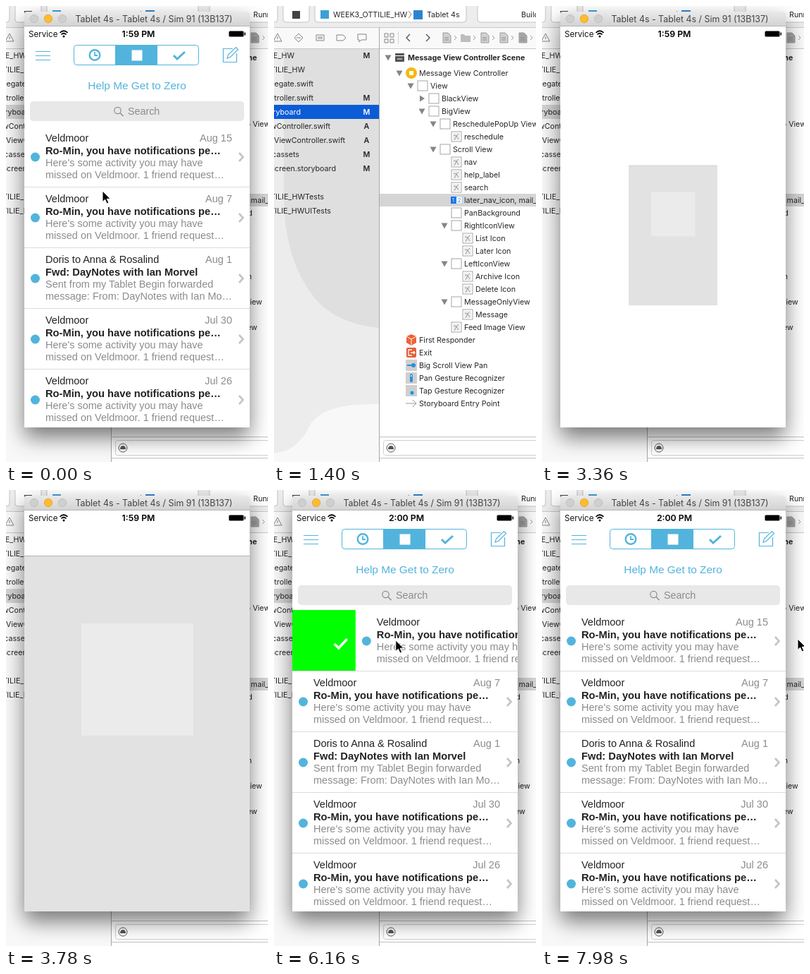
These frames come from a looping animation (372x646 px, 8 s). An HTML page:

```html
<!DOCTYPE html>
<html>
<head>
<meta charset="utf-8">
<style>
html, body { margin: 0; width: 100%; height: 100%; overflow: hidden; background: #fff; }
svg { display: block; width: 372px; height: 646px; }
text { white-space: pre; }
.ui { font-family: Inter, Roboto, sans-serif; font-size: 10.7px; fill: #262626; }
.app { font-family: "Liberation Sans", Arial, sans-serif; font-size: 14.5px; fill: #222; }
.app .soft { fill: #8c8c8c; }
.app .bold { font-weight: bold; font-size: 14.7px; }
</style>
</head>
<body>
<script>
const LOOP = 8000, STEP = 70, BLUE = '#52b4dc';

const rect = (x, y, w, h, fill, more = '') =>
  `<rect x="${x}" y="${y}" width="${w}" height="${h}" fill="${fill}" ${more}/>`;
const line = (d, color, w = 1, more = '') =>
  `<path d="${d}" fill="none" stroke="${color}" stroke-width="${w}" ${more}/>`;
const text = (x, y, s, more = '') =>
  `<text x="${x}" y="${y}" ${more}>${s.replace(/&/g, '&amp;')}</text>`;
const circle = (x, y, r, fill, more = '') =>
  `<circle cx="${x}" cy="${y}" r="${r}" fill="${fill}" ${more}/>`;

// Editor window
const files = [
  [70, 'IE_HW', 29, 'M'], [90, 'TILIE_HW', 44], [110, 'Delegate.swift', 56],
  [130, 'ViewController.swift', 56, 'M'], [150, 'Main.storyboard', 38, 'M'],
  [170, 'NewController.swift', 80, 'A'], [190, 'NewViewController.swift', 101, 'A'],
  [210, 'Assets.xcassets', 36, 'M'], [230, 'LaunchScreen.storyboard', 88, 'M'],
  [270, 'TILIE_HWTests', 71], [290, 'TILIE_HWUITests', 81]
];

// label, text x, icon, disclosure (v open, > closed)
const outline = [
  ['Message View Controller', 206, 'ctrl', 'v'], ['View', 222, 'box', 'v'],
  ['BlackView', 238, 'box', '>'], ['BigView', 238, 'box', 'v'],
  ['ReschedulePopUp View', 254, 'box', 'v'], ['reschedule', 270, 'img'],
  ['Scroll View', 254, 'box', 'v'], ['nav', 270, 'img'], ['help_label', 270, 'img'],
  ['search', 270, 'img'], ['later_nav_icon, mail_nav_icon', 270, 'seg'],
  ['PanBackground', 270, 'box'], ['RightIconView', 270, 'box', 'v'],
  ['List Icon', 286, 'img'], ['Later Icon', 286, 'img'],
  ['LeftIconView', 270, 'box', 'v'], ['Archive Icon', 286, 'img'],
  ['Delete Icon', 286, 'img'], ['MessageOnlyView', 270, 'box', 'v'],
  ['Message', 286, 'img'], ['Feed Image View', 270, 'img'],
  ['First Responder', 206, 'cube'], ['Exit', 206, 'exit'],
  ['Big Scroll View Pan', 206, 'pan'], ['Pan Gesture Recognizer', 206, 'drag'],
  ['Tap Gesture Recognizer', 206, 'tap'], ['Storyboard Entry Point', 206, 'entry']
];

const frame = (x, y) => rect(x - 7, y - 7, 14, 14, '#fff', 'stroke="#a5a5a5"');
const tile = (x, y) => rect(x - 8, y - 8, 16, 16, '#cfcfcf');
const icons = {
  box: frame,
  img: (x, y) => frame(x, y) + rect(x - 5, y - 5, 10, 10, '#ededed') +
    line(`M${x - 3} ${y + 5}L${x} ${y - 1}L${x + 3} ${y + 4}M${x - 4} ${y - 2}L${x} ${y - 1}L${x + 3} ${y - 4}`, '#999'),
  ctrl: (x, y) => circle(x, y, 8, '#f3b912') + rect(x - 3, y - 3, 6, 6, '#fff', 'rx="1"'),
  seg: (x, y) => rect(x - 8, y - 5, 8, 10, '#1673e6') + rect(x, y - 5, 8, 10, '#fff', 'stroke="#9cc2ee" stroke-width=".7"') +
    text(x - 6, y + 3, '1', 'style="font-size:7px;fill:#fff"') + text(x + 2, y + 3, '2', 'style="font-size:7px;fill:#1673e6"'),
  cube: (x, y) => `<path d="M${x} ${y - 8}l7 3v9l-7 4l-7-4v-9z" fill="#ec6338"/>` +
    line(`M${x - 7} ${y - 5}l7 4l7-4M${x} ${y - 1}v8`, '#fff'),
  exit: (x, y) => rect(x - 7, y - 7, 14, 14, '#ea5b37', 'rx="2"') +
    line(`M${x + 1} ${y - 4}h-5v8h5M${x - 1} ${y}h6m-2-2l2 2l-2 2`, '#fff', 1.3),
  pan: (x, y) => tile(x, y) + line(`M${x - 6} ${y}h12`, '#2b8fd8', 2) + circle(x + 3, y, 3, '#2b8fd8'),
  drag: (x, y) => tile(x, y) + rect(x - 2, y - 6, 4, 12, '#2b8fd8', 'rx="2"') + circle(x, y - 3, 1, '#fff'),
  tap: (x, y) => tile(x, y) + circle(x + 1, y + 3, 3, '#2b8fd8', 'stroke="#9fd0f2"'),
  entry: (x, y) => line(`M${x - 8} ${y}h15m-5-5l5 5l-5 5`, '#999')
};
const arrow = (x, y, kind) => kind === 'v'
  ? `<path d="M${x - 4.5} ${y - 3.5}h9l-4.5 8z" fill="#858585"/>`
  : `<path d="M${x - 3} ${y - 4.5}v9l7-4.5z" fill="#858585"/>`;

function editor() {
  const gray = '#838383', field = 'rx="4" stroke="#c4c4c4"';
  let s = rect(0, 0, 372, 646, '#fff') + rect(0, 0, 149, 646, '#f8f8f8') +
    `<g id="tint"><path d="M0 60H149V564Q62 562 48 600Q30 632 0 633Z" fill="#ececec"/>
     <path d="M14 60H149V456Q88 450 58 414Q14 360 14 270Z" fill="#dfdfdf"/></g>` +
    rect(0, 0, 372, 30, '#ededed') + rect(0, 30, 372, 30, '#f9f9f9') +
    line('M0 30.5H372M0 60.5H372', '#c9c9c9');
  s += rect(-20, -4, 25, 27, '#fff', field) +
    rect(13, -4, 37, 27, '#fff', field) + rect(26, 7, 11, 11, '#424242') +
    rect(58, -4, 215, 27, '#fff', field) + rect(66, 6, 12, 12, '#3d9fd6') +
    text(84, 16, 'WEEK3_OTTILIE_HW') + line('M191 7l4 5l-4 5', '#777') +
    rect(198, 6, 13, 13, '#2e83cf') + text(217, 16, 'Tablet 4s') +
    rect(289, -4, 100, 27, '#fff', field) + text(352, 16, '', 'id="status"');
  s += line('M-1 50l6-11l6 11zM5 43v4M29 45l6-6l6 6l-6 6zM32 45h6M60 41h11v8h-11zM62 44h7M62 46h7' +
    'M89 41h9l4 4l-4 4h-9zM119 40h12v8h-7l-3 3v-3h-2z', gray) +
    line('M157 39h5v5h-5zM165 39h5v5h-5zM157 47h5v5h-5zM165 47h5v5h-5z', gray) +
    line('M176.5 36V54', '#d2d2d2') + line('M193 40l-5 5l5 5M216 40l5 5l-5 5', '#555', 1.4);
  for (let i = 0; i < 5; i++) {
    const x = 245 + 27 * i;
    s += i === 1
      ? `<path d="M${x - 7} 40h5l1 2h8v9h-14z" fill="#bdbdbd"/>`
      : `<path d="M${x - 5} 38h7l4 4v10h-11z" fill="${i === 4 ? '#a6a6a6' : '#d0d0d0'}" stroke="#9b9b9b"/>` +
        line(`M${x - 3} 45h6M${x - 3} 48h6`, '#888');
    s += line(`M${x + 11} 42l3 3l-3 3`, '#999');
  }
  s += rect(0, 140, 149, 20, '#d4d4d4', 'id="pick"') +
    rect(0, 140, 20, 20, '#333f4d', 'id="shade"');
  for (const [y, name, end, mark] of files) {
    const cls = y === 150 ? 'class="picked"' : '';
    s += text(end, y + 4, name, `text-anchor="end" ${cls}`);
    if (mark) s += text(131.5, y + 4, mark, `text-anchor="middle" font-weight="600" ${cls}`);
  }
  s += line('M149.5 30V646', '#a8a8a8') + rect(150, 266, 222, 18, '#d5d5d5') +
    arrow(162, 73, 'v') + rect(172, 67, 13, 12, '#555', 'rx="1"') +
    line('M172 70.5h13M175 75h7', '#fff') +
    text(190, 77, 'Message View Controller Scene', 'font-weight="700"');
  outline.forEach(([name, x, icon, open], i) => {
    const y = 95 + 18 * i;
    s += icons[icon](x - 11, y) + text(x, y + 4, name);
    if (open) s += arrow(x - 28, y, open);
  });
  s += line('M150 610.5H372M150 640.5H372', '#c2c2c2') +
    rect(155.5, 615.5, 240, 21, '#fff', 'rx="3" stroke="#cfcfcf"') +
    circle(166, 626, 6, '#fff', 'stroke="#555"') +
    '<path d="M162 628q0-5 4-5t4 5z" fill="#555"/>';
  return `<g class="ui">${s}</g>`;
}

// Phone window
const note = ['Veldmoor', 'Ro-Min, you have notifications pe…',
  "Here's some activity you may have", 'missed on Veldmoor. 1 friend request…'];
const fwd = ['Doris to Anna & Rosalind', 'Fwd: DayNotes with Ian Morvel',
  'Sent from my Tablet Begin forwarded', 'message: From: DayNotes with Ian Mo…'];

function row(y, date, [from, subject, a, b]) {
  return rect(26, y, 320, 86, '#fff') + text(56, y + 22, from) +
    text(321, y + 22, date, 'class="soft" text-anchor="end"') +
    text(56, y + 40, subject, 'class="bold"') +
    text(56, y + 57, a, 'class="soft"') + text(56, y + 74, b, 'class="soft"') +
    circle(41.5, y + 44, 6.5, BLUE) +
    line(`M331 ${y + 38}l5.5 6l-5.5 6`, '#c4c4c8', 2.6);
}

function mail() {
  let s = rect(26, 50, 320, 547, '#fff') +
    line('M42 64.5H63M42 70.5H63M42 76.5H63', BLUE, 1.2) +
    rect(96.5, 55.5, 177, 28, '#fff', `rx="4" stroke="${BLUE}"`) + rect(155, 55, 60, 29, BLUE) +
    rect(178.5, 62.5, 15, 15, '#fff') +
    circle(126, 69.5, 7.3, 'none', `stroke="${BLUE}" stroke-width="2.4"`) +
    line('M126 65v5h4', BLUE, 1.8) + line('M238 70l5 5l11-10', BLUE, 3) +
    line('M322 60.5H308.5V79.5H327.5V67M314 74l1.5-5l11-10.5l3 3l-11 11z', BLUE, 1.2) +
    text(186, 118, 'Help Me Get to Zero', `text-anchor="middle" style="font-size:15.4px;fill:${BLUE}"`) +
    rect(34, 135, 304, 28, '#e8e8e9', 'rx="5"') +
    circle(158.5, 148, 4.7, 'none', 'stroke="#8b8b90" stroke-width="1.2"') +
    line('M162 151.5l4.5 4.5', '#8b8b90', 1.4) +
    text(173, 154, 'Search', 'style="font-size:14.3px;fill:#8b8b90"');
  s += rect(26, 170, 320, 86, '#0f0', 'id="under"') +
    `<g id="check">${line('M-9 1l6 6l12-13', '#fff', 3.4)}</g>` +
    `<g id="first">${row(170, 'Aug 15', note)}</g>`;
  ['Aug 7', 'Aug 1', 'Jul 30', 'Jul 26'].forEach((date, i) => {
    const y = 256 + 86 * i;
    s += row(y, date, i === 1 ? fwd : note) + line(`M26 ${y + .5}H346`, '#dcdcdc');
  });
  return s;
}

function phone() {
  const lights = [40, 60, 80].map((x, i) => circle(x, 18, 5.7, i === 1 ? '#fdbc2e' : '#cfcfcf',
    `stroke="${i === 1 ? '#e0a028' : '#bcbcbc'}" stroke-width=".8"`)).join('');
  return rect(26, 22, 320, 589, '#000', 'opacity=".52" filter="url(#blur)"') +
    `<g clip-path="url(#win)">` + rect(26, 8, 320, 589, '#fff') +
    rect(26, 8, 320, 21, 'url(#bar)') + line('M26 28.5H346', '#b5b5b5') + lights +
    `<g class="ui">` +
    text(210, 22.5, 'Tablet 4s - Tablet 4s / Sim 91 (13B137)', 'text-anchor="middle" style="font-size:12.4px;fill:#444"') +
    `</g><g id="launch">` + rect(26, 93, 320, 504, '#e2e2e2') + line('M26 93.5H346', '#b2b2b2') +
    rect(107, 189, 159, 159, '#ebebeb') + `</g><g id="mail" class="app">${mail()}</g><g class="ui">` +
    text(32, 44, 'Service', 'style="font-size:11.6px;fill:#111"') +
    text(188, 44, '', 'id="clock" text-anchor="middle" style="font-size:12.3px;font-weight:600;fill:#000"') +
    line('M76.5 38Q82 32.5 87.5 38M78.5 40.5Q82 37 85.5 40.5', '#000', 1.7) + circle(82, 43, 1.5, '#000') +
    rect(316.5, 35.5, 21, 8, '#000', 'rx="1.5"') + rect(338.5, 37.5, 1.5, 4, '#000') + '</g></g>';
}

document.body.innerHTML = `<svg viewBox="0 0 372 646"><defs>
  <filter id="blur" x="-30%" y="-20%" width="160%" height="140%"><feGaussianBlur stdDeviation="15"/></filter>
  <linearGradient id="bar" x2="0" y2="1"><stop stop-color="#e9e9e9"/><stop offset="1" stop-color="#d2d2d2"/></linearGradient>
  <clipPath id="win"><path d="M26 597V12q0-4 4-4H342q4 0 4 4V597z"/></clipPath></defs>
  ${editor()}<g id="phone">${phone()}</g>
  <path id="cursor" d="M0 0V15.5L3.6 12.2L6.2 18L8.8 16.8L6.3 11.2H11.2Z" fill="#000" stroke="#fff"/></svg>`;

const $ = id => document.getElementById(id);
const picked = document.querySelectorAll('.picked');
const show = (id, on) => $(id).setAttribute('visibility', on ? 'visible' : 'hidden');
const move = (id, x, y) => $(id).setAttribute('transform', `translate(${x} ${y})`);
const ramp = (t, a, b) => Math.min(1, Math.max(0, (t - a) / (b - a)));
const ease = k => k * k * (3 - 2 * k);

// Eased value between [time, ...values] keys
function track(keys, t) {
  const i = keys.findIndex(k => k[0] > t);
  if (i < 0) return keys[keys.length - 1].slice(1);
  if (i === 0) return keys[0].slice(1);
  const a = keys[i - 1], b = keys[i], k = ease(ramp(t, a[0], b[0]));
  return a.slice(1).map((v, n) => v + (b[n + 1] - v) * k);
}

const pointer = [[0, 137, 262], [140, 137, 262], [350, -14, 22], [4410, -14, 8], [4690, 61, 168],
  [4830, 61, 168], [5040, 85, 187], [5180, 15, 250], [5250, 45, 272], [5390, 83, 213]];
const drag = [[5810, 0], [6300, 112], [6650, 148], [6790, 157], [7070, 205], [7350, 138],
  [7490, 165], [7700, 278], [7980, 0]];

function draw(t) {
  const front = t < 910 || t >= 3220;
  const busy = t >= 910 && t < 1820;
  show('phone', front);
  show('tint', !front);
  show('shade', t >= 2100 && t < 2590);
  $('pick').setAttribute('fill', front ? '#d4d4d4' : busy ? '#0c5cd6' : '#1b77f4');
  picked.forEach(p => p.style.fill = front ? '' : '#fff');

  const building = t >= 1260 && t < 2100, attaching = t >= 2100 && t < 3220;
  $('status').textContent = building ? 'Building' : attaching ? 'Attaching' : 'Running';
  $('status').setAttribute('x', attaching ? 355 : 351);
  $('clock').textContent = t < 5250 ? '1:59 PM' : '2:00 PM';

  const zoom = t < 910 ? 1 : ease(ramp(t, 3150, 3640));
  $('launch').setAttribute('transform', `translate(186 312) scale(${zoom}) translate(-186 -312)`);
  $('mail').setAttribute('opacity', t < 910 ? 1 : ramp(t, 3850, 4270));

  const [off] = track(drag, t);
  move('first', off, 0);
  move('check', 5 + Math.max(60, off), 217);
  $('check').setAttribute('opacity', ramp(off, 0, 60));
  $('under').setAttribute('fill', off < 60 ? '#e2e2e2' : '#0f0');

  let [x, y] = track(pointer, t);
  if (t > 5810) x = t < 7700 ? 83 + off : 363;
  move('cursor', x, t > 7490 ? 211 : y);
}

function tick(now) {
  draw(Math.floor(now % LOOP / STEP) * STEP);
  requestAnimationFrame(tick);
}
requestAnimationFrame(tick);
</script>
</body>
</html>
```
